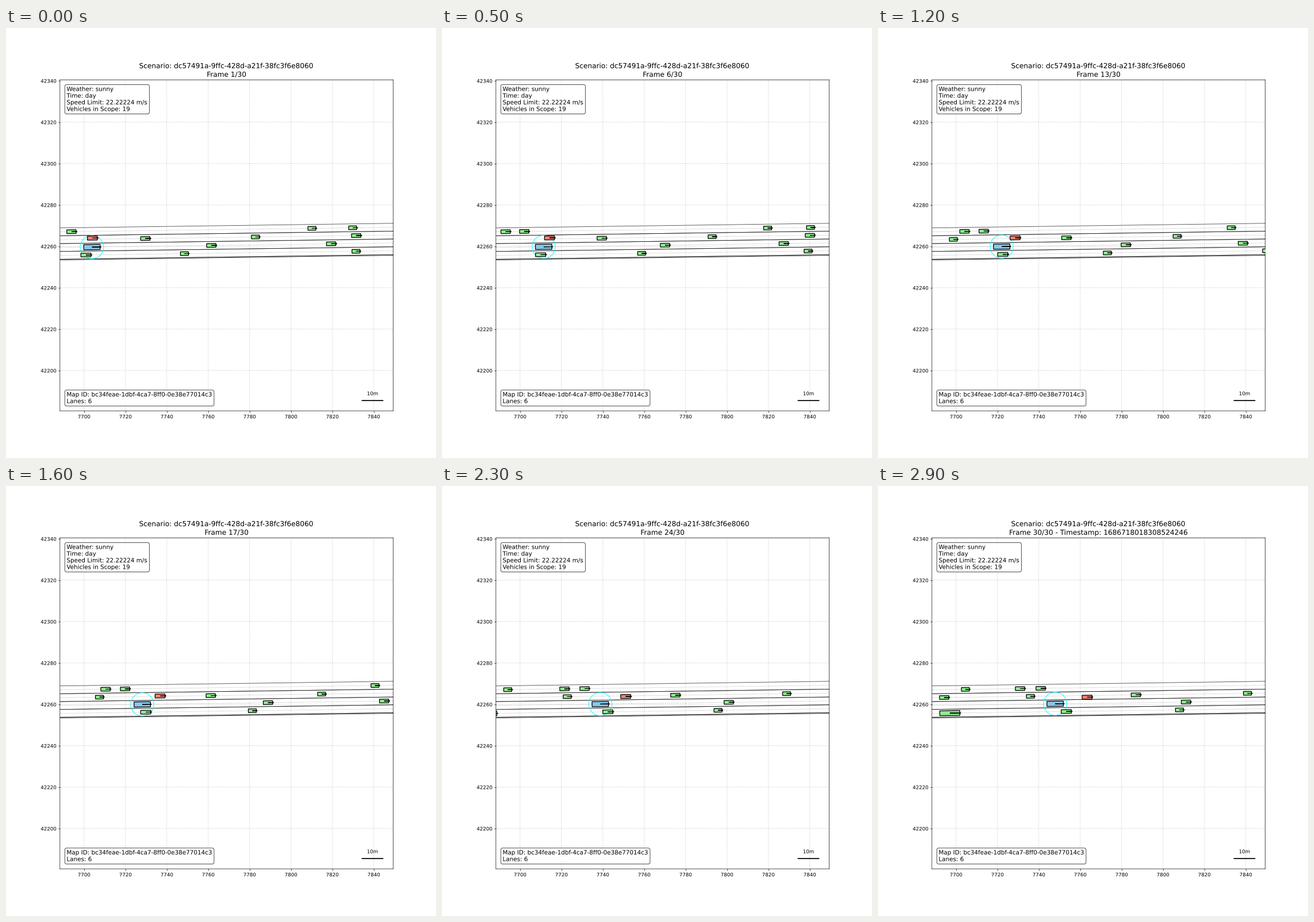
Recreate the animation shown at these times as a matplotlib script. Size 748 px wide and 748 px high, loop 3000 ms.

```python
import numpy as np
import matplotlib.pyplot as plt
from matplotlib.animation import FuncAnimation
from matplotlib.patches import Circle, Polygon
from matplotlib.patheffects import Normal
from matplotlib.text import Text

# Lines and glyphs keep their exact positions instead of moving to whole pixels.
plt.rcParams.update({"font.family": "DejaVu Sans", "path.snap": False})

SIZE = 748
FRAMES = 30
STEP = 0.1                              # seconds per frame
XMIN, XMAX = 7688.33, 7849.37
YMIN, YMAX = 42180.49, 42340.49

# Road geometry in metres
X_START = 7700
X_MID = 7768.85
ROAD_TOP = 42270.02                     # upper border at X_MID
LANE = 3.79
SHOULDER = 0.36
SLOPE = 0.0138

fig = plt.figure(figsize=(12, 12), dpi=SIZE / 12, facecolor="white")
ax = fig.add_axes([150.5 / 1200, 131.5 / 1200, 0.775, 0.77])
ax.set_xlim(XMIN, XMAX)
ax.set_ylim(YMIN, YMAX)
ax.set_xticks(range(7700, 7841, 20))
ax.set_yticks(range(42200, 42341, 20))
ax.ticklabel_format(useOffset=False, style="plain")
ax.set_axisbelow(True)
ax.grid(True, linestyle="--", alpha=0.6)
ax.set_autoscale_on(False)


def road_y(x, depth):
    """Height of the point `depth` metres below the upper road border."""
    return ROAD_TOP - depth + SLOPE * (x - X_MID)


def road_line(depth, **style):
    ax.plot([XMIN, XMAX], [road_y(XMIN, depth), road_y(XMAX, depth)], **style)


def draw_lane(top, width):
    for depth in (top, top + width):
        road_line(depth, color="black", lw=1, alpha=0.7)


for k in range(4):
    draw_lane(k * LANE, LANE)
    road_line((k + 0.5) * LANE, color="gray", lw=0.8, ls="--", alpha=0.5)
draw_lane(4 * LANE, SHOULDER)


def info_box(y, va, text):
    ax.text(0.02, y, text, transform=ax.transAxes, va=va, fontsize=12, zorder=10,
            bbox=dict(boxstyle="round", facecolor="white", alpha=0.8))


info_box(0.98, "top", "Weather: sunny\nTime: day\nSpeed Limit: 22.22224 m/s\nVehicles in Scope: 19")
info_box(0.02, "bottom", "Map ID: bc34feae-1dbf-4ca7-8ff0-0e38e77014c3\nLanes: 6")

ax.plot([XMAX - 15, XMAX - 5], [YMIN + 5] * 2, color="black", lw=2)
ax.text(XMAX - 10, YMIN + 7, "10m", ha="center", va="bottom", fontsize=10)
title = ax.set_title("", fontsize=14)
halo = ax.add_patch(Circle((0, 0), 5.6, fill=False, ec="cyan", lw=1.5, alpha=0.75, zorder=3))

for label in fig.findobj(Text):
    label.set_path_effects([Normal()])

TURN = np.array([[1, SLOPE], [-SLOPE, 1]])


class Car:
    """A vehicle that keeps its lane and speed (m/s)."""

    def __init__(self, lane, start, speed, length=4.5, width=1.8, color="lightgreen"):
        self.lane, self.start, self.speed = lane, start, speed
        l, w = length / 2, width / 2
        self.shapes = [
            np.array([(-l, -w), (l, -w), (l, w), (-l, w)]) @ TURN,
            np.array([(0, 0), (l, 0), (l, 0.25), (l + 0.5, 0), (l, -0.25), (l, 0)]) @ TURN,
        ]
        self.patches = [
            ax.add_patch(Polygon(self.shapes[0], fc=color, ec="black", lw=1.5, zorder=4)),
            ax.add_patch(Polygon(self.shapes[1], fc="black", ec="black", lw=1.3, zorder=5)),
        ]

    def drift(self, i):
        return 0

    def move(self, i):
        x = X_START + self.start + self.speed * i * STEP
        y = road_y(x, (self.lane + 0.5) * LANE + self.drift(i))
        for shape, patch in zip(self.shapes, self.patches):
            patch.set_xy(shape + (x, y))
        return x, y


class LaneChanger(Car):
    def drift(self, i):
        return 1.35 * (i / (FRAMES - 1)) ** 2 - 0.55


SMALL = 3.85
traffic = [
    Car(0, -46.1, 17.45, SMALL), Car(0, -14.9, 15.8), Car(0, -6.1, 16.2),
    Car(0, 110.1, 19.05, SMALL), Car(0, 129.8, 21.1, SMALL),
    Car(1, -62, 19.4), Car(1, -27.6, 21.9, SMALL), Car(1, 29.6, 19.75),
    Car(1, 82.8, 20, SMALL), Car(1, 131.5, 17.1),
    Car(2, 61.5, 17.1), Car(2, 119.4, 16),
    Car(3, -66.1, 21.75, 9.7, 2.35), Car(3, 0.9, 18.05, 4.9),
    Car(3, 48.5, 20.5, SMALL), Car(3, 131.4, 15.55, SMALL),
    LaneChanger(1, 4, 20.45, 4.8, 1.9, "salmon"),
]
ego = Car(2, 3.8, 15.2, 7.95, 2.5, "#85c8ec")


def update(i):
    text = f"Scenario: dc57491a-9ffc-428d-a21f-38fc3f6e8060\nFrame {i + 1}/{FRAMES}"
    if i == FRAMES - 1:
        text += " - Timestamp: 1686718018308524246"
    title.set_text(text)
    for car in traffic:
        car.move(i)
    halo.center = ego.move(i)
    return []


anim = FuncAnimation(fig, update, frames=FRAMES, interval=1000 * STEP, repeat=True, repeat_delay=0)
plt.show()
```
